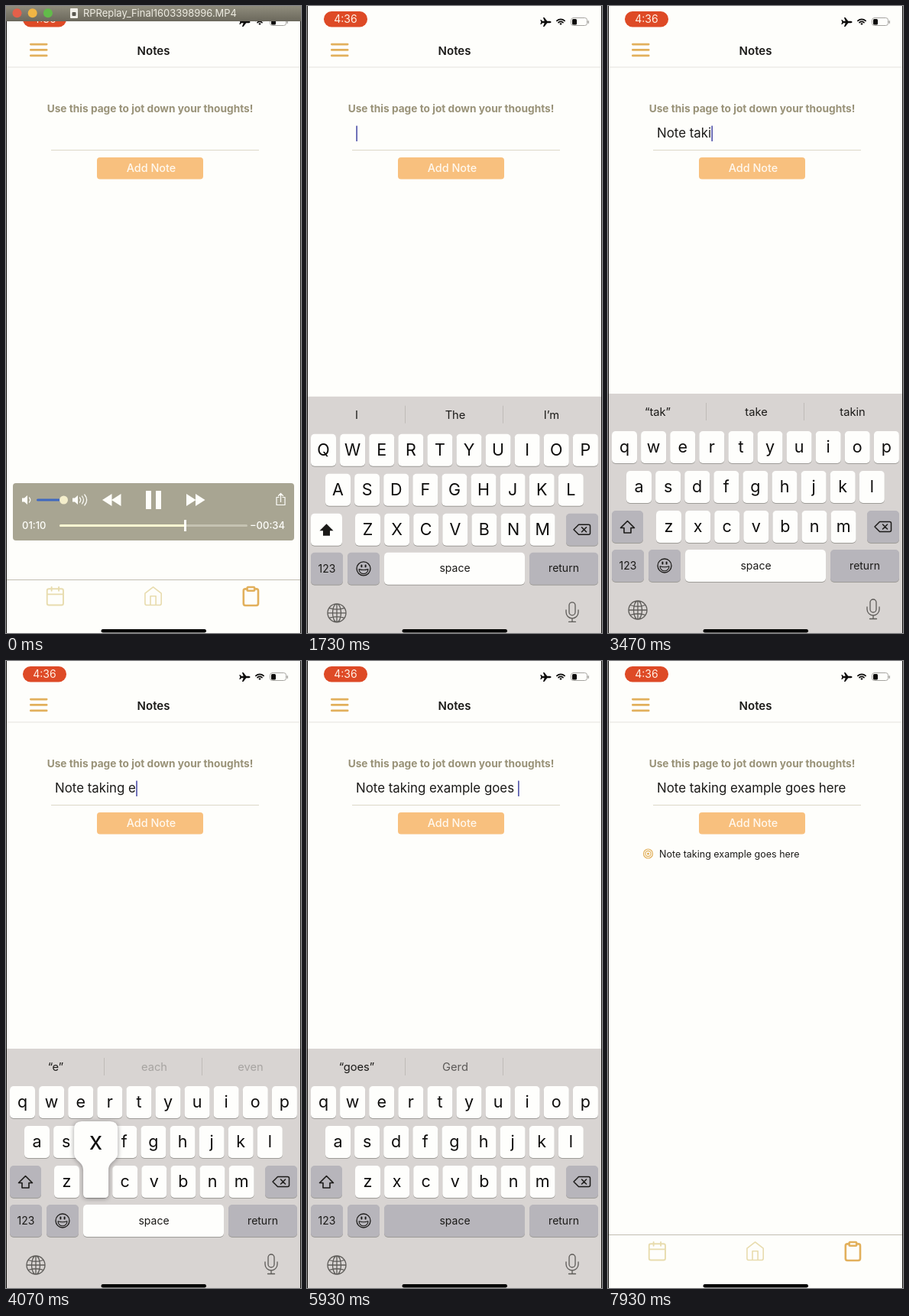
These frames come from a looping animation (386x820 px, 8 s). An HTML page with a canvas:

```html
<!DOCTYPE html>
<html lang="en">
<head>
<meta charset="utf-8">
<title>Notes</title>
<style>
  html, body { margin: 0; width: 100%; height: 100%; overflow: hidden; background: #fefefb; }
  canvas { display: block; width: 386px; height: 820px; }
</style>
</head>
<body>
<canvas id="stage"></canvas>
<script>
const W = 386, H = 820, LOOP = 8000;
const canvas = document.getElementById('stage');
const ctx = canvas.getContext('2d');
const ratio = window.devicePixelRatio || 1;
canvas.width = W * ratio;
canvas.height = H * ratio;

const PAGE = '#fefefb', INK = '#1b1a18', KEY = '#fefefc', GREY = '#b7b5bb';
const BOARD = '#d8d4d2', GOLD = '#e2b05c', PALE = '#e8dcae';

const NOTE = 'Note taking example goes here';
// moment each character of NOTE lands in the field
const TYPED = [2250, 2450, 2570, 2710, 2850, 2990, 3130, 3260, 3400, 3570, 3700,
  3830, 3960, 4090, 4210, 4330, 4460, 4580, 4700, 4950, 5180, 5380, 5580, 5780,
  5900, 6060, 6210, 6360, 6510];
// suggestion bar after each character
const HINTS = ['I|The|I’m', '“N”||', '“No”|Not|Now', '“Not”|Note|Nothing', '“Note”|Notes|Noted',
  'that|to|the', '“t”|to|the', '“ta”|take|talk', '“tak”|take|takin', '“taki”|taking|takin',
  '“takin”|taking|', '“taking”|takings|', 'the|a|it', '“e”|each|even', '“ex”|example|extra',
  '“exa”|exactly|example', '“exam”|example|exams', '“examp”|example|examples',
  '“exampl”|examples|', '“example”|examples|examples', 'of|is|for', '“g”|good|going',
  '“go”|good|going', '“goe”|goes|', '“goes”|Gerd|', 'to|on|the', '“h”|here|how',
  '“he”|here|her', '“her”|here|hers', '“here”|hereby|'].map(s => s.split('|'));
const HINT_LAG = 85, HINT_FADE = 100;
const HINT_X = [65, 194, 320];

const ROWS = [['qwertyuiop', 21.5, 556], ['asdfghjkl', 40.5, 608], ['zxcvbnm', 79.5, 660]];
const STEP = 38.1, KEY_W = 33, KEY_H = 42;

const PLAYER_FADE = [200, 550];
const BOARD_IN = [1500, 1800], BOARD_OUT = [6900, 7180];
const RETURN_PRESS = [6810, 6900], ADD_PRESS = [7420, 7540];

const clamp = (v, a = 0, b = 1) => Math.min(b, Math.max(a, v));
const span = (t, [a, b]) => clamp((t - a) / (b - a));
const within = (t, [a, b]) => t >= a && t < b;
const typedBy = t => TYPED.filter(at => at <= t).length;
const easeOut = p => 1 - (1 - p) ** 3;

function box(x, y, w, h, r, color) {
  ctx.fillStyle = color;
  ctx.beginPath();
  ctx.roundRect(x, y, w, h, r);
  ctx.fill();
}

function disc(x, y, r, color) {
  ctx.fillStyle = color;
  ctx.beginPath();
  ctx.arc(x, y, r, 0, Math.PI * 2);
  ctx.fill();
}

function text(str, x, y, size, color, { weight = 400, align = 'center' } = {}) {
  ctx.font = `${weight} ${size}px Inter, sans-serif`;
  ctx.textAlign = align;
  ctx.textBaseline = 'alphabetic';
  ctx.fillStyle = color;
  ctx.fillText(str, x, y);
}

// strokes or fills an SVG path placed at x, y
function glyph(d, x, y, { scale = 1, color = INK, width = 1.5, fill = false } = {}) {
  ctx.save();
  ctx.translate(x, y);
  ctx.scale(scale, scale);
  const path = new Path2D(d);
  if (fill) {
    ctx.fillStyle = color;
    ctx.fill(path);
  } else {
    ctx.strokeStyle = color;
    ctx.lineWidth = width / scale;
    ctx.lineCap = ctx.lineJoin = 'round';
    ctx.stroke(path);
  }
  ctx.restore();
}

function statusBar() {
  box(22, 7, 57, 20.5, 10, '#de4a26');
  text('4:36', 50.5, 22, 14, '#fff1e6');
  const plane = 'M7 0C7-1.2 5.5-1.3 4.5-1.3H1.8L-2-6H-3.6L-1.8-1.3H-4.6L-6-3H-7.2L-6.2 0L-7.2 3H-6L-4.6 1.3H-1.8L-3.6 6H-2L1.8 1.3H4.5C5.5 1.3 7 1.2 7 0Z';
  glyph(plane, 312.5, 21, { fill: true, color: '#0c0b0a' });
  glyph('M-5.8-1.6A8.2 8.2 0 0 1 5.8-1.6M-3.4 1A4.8 4.8 0 0 1 3.4 1', 332, 20.8,
    { scale: 0.88, width: 1.7, color: '#0c0b0a' });
  glyph('M-1.9 2.7A2.7 2.7 0 0 1 1.9 2.7L0 4.9Z', 332, 20.8,
    { scale: 0.88, fill: true, color: '#0c0b0a' });
  glyph('M3 0H18A3 3 0 0 1 21 3V7A3 3 0 0 1 18 10H3A3 3 0 0 1 0 7V3A3 3 0 0 1 3 0Z',
    345.5, 15.5, { width: 1, color: '#a5a4a0' });
  box(347, 17, 6, 7.5, 1.5, '#0c0b0a');
  box(367.5, 19, 1.5, 4, 1, '#a5a4a0');
}

function header() {
  for (let i = 0; i < 3; i++) box(31, 48.7 + i * 7.4, 23.5, 2.7, 1.3, GOLD);
  text('Notes', 193, 64, 15, INK, { weight: 600 });
  box(1, 79.5, W - 2, 1, 0, '#e5e3dd');
}

function tabBar() {
  box(1, 750, W - 2, 1, 0, '#c2beb2');
  glyph('M5 4H19A2 2 0 0 1 21 6V20A2 2 0 0 1 19 22H5A2 2 0 0 1 3 20V6A2 2 0 0 1 5 4ZM16 2V6M8 2V6M3 10H21',
    50.2, 757.6, { scale: 1.18, width: 1.9, color: PALE });
  glyph('M3 9L12 2L21 9V20A2 2 0 0 1 19 22H5A2 2 0 0 1 3 20ZM9 22V12H15V22',
    178.4, 757.6, { scale: 1.18, width: 1.6, color: PALE });
  glyph('M16 4H18A2 2 0 0 1 20 6V20A2 2 0 0 1 18 22H6A2 2 0 0 1 4 20V6A2 2 0 0 1 6 4H8M9 2H15A1 1 0 0 1 16 3V5A1 1 0 0 1 15 6H9A1 1 0 0 1 8 5V3A1 1 0 0 1 9 2Z',
    306, 757.6, { scale: 1.2, width: 2.6, color: GOLD });
}

function notesPage(t, count) {
  text('Use this page to jot down your thoughts!', 188.5, 138.5, 13.7, '#999278', { weight: 700 });
  box(59, 188, 272, 1, 0, '#dcd8c8');

  const value = NOTE.slice(0, count);
  text(value, 64, 172.3, 16.85, INK, { align: 'left' });
  if (within(t, [BOARD_IN[0], BOARD_OUT[0]])) {
    box(64.3 + ctx.measureText(value).width, 156.5, 1.6, 20.5, 0.5, '#4c4fa8');
  }

  ctx.globalAlpha = within(t, ADD_PRESS) ? 0.4 : 1;
  box(119, 198, 139, 28.5, 4, '#f8c07e');
  text('Add Note', 190, 217, 14.4, '#fff8ee', { weight: 500 });
  ctx.globalAlpha = 1;

  if (t >= ADD_PRESS[1]) {
    for (const r of [6, 3.6]) {
      glyph(`M${r} 0A${r} ${r} 0 1 1 ${-r} 0A${r} ${r} 0 1 1 ${r} 0Z`, 52.5, 252,
        { width: 1.2, color: GOLD });
    }
    disc(52.5, 252, 1.6, GOLD);
    text(NOTE, 67, 257, 12.5, INK, { align: 'left' });
  }
}

function key(x, y, w, color) {
  box(x, y + 1, w, KEY_H, 5, '#9e9c98');
  box(x, y, w, KEY_H, 5, color);
}

function popup(ch, x, y) {
  const c = clamp(x, 32, W - 32), l = x - 16.5, r = x + 16.5;
  const left = c - 28.5, right = c + 28.5, top = y - 58, low = y + 42;
  ctx.save();
  ctx.shadowColor = 'rgba(60,58,60,.5)';
  ctx.shadowBlur = 6 * ratio;
  ctx.shadowOffsetY = ratio;
  ctx.fillStyle = KEY;
  ctx.beginPath();
  ctx.moveTo(left, top + 10);
  ctx.quadraticCurveTo(left, top, left + 10, top);
  ctx.lineTo(right - 10, top);
  ctx.quadraticCurveTo(right, top, right, top + 10);
  ctx.lineTo(right, y - 16);
  ctx.bezierCurveTo(right, y - 6, r, y - 6, r, y + 6);
  ctx.lineTo(r, low - 5);
  ctx.quadraticCurveTo(r, low, r - 5, low);
  ctx.lineTo(l + 5, low);
  ctx.quadraticCurveTo(l, low, l, low - 5);
  ctx.lineTo(l, y + 6);
  ctx.bezierCurveTo(l, y - 6, left, y - 6, left, y - 16);
  ctx.closePath();
  ctx.fill();
  ctx.restore();
  text(ch, c, y - 21, 32, '#0e0d0c');
}

// the bar trails the typing a little, and new words fade in
function hints(t) {
  const shown = typedBy(t - HINT_LAG);
  const now = HINTS[shown], before = HINTS[Math.max(0, shown - 1)];
  const fresh = shown ? clamp((t - HINT_LAG - TYPED[shown - 1]) / HINT_FADE) : 1;
  now.forEach((word, i) => {
    ctx.globalAlpha = i && word !== before[i] ? fresh : 1;
    text(word, HINT_X[i], 536, 14.7, INK);
  });
  ctx.globalAlpha = 1;
  box(128, 519, 1, 23, 0, '#bfbbb8');
  box(256, 519, 1, 23, 0, '#bfbbb8');
}

function keyboard(t, count) {
  const shown = easeOut(span(t, BOARD_IN)) - easeOut(span(t, BOARD_OUT));
  if (shown <= 0) return;
  const pressed = TYPED.findIndex(at => within(t, [at - 90, at + 50]));
  const active = pressed < 0 ? '' : NOTE[pressed];
  const upper = count === 0;

  ctx.save();
  ctx.translate(0, (1 - shown) * (H - 507));
  box(1, 507, W - 2, H - 507, 0, BOARD);
  hints(t);

  let bubble = null;
  for (const [letters, x0, y] of ROWS) {
    [...letters].forEach((ch, i) => {
      const x = x0 + i * STEP;
      key(x - KEY_W / 2, y, KEY_W, KEY);
      text(upper ? ch.toUpperCase() : ch, x, y + 28, 21.5, '#0e0d0c');
      if (active && ch === active.toLowerCase()) bubble = [active, x, y];
    });
  }

  key(5, 660, 41, upper ? KEY : GREY);
  glyph('M0-8L9 1H4.5V7.5H-4.5V1H-9Z', 25.5, 681.5, { width: 1.6, fill: upper });
  key(339, 660, 42, GREY);
  glyph('M-11 0L-4.5-6.5H8.5A2 2 0 0 1 10.5-4.5V4.5A2 2 0 0 1 8.5 6.5H-4.5ZM-.5-3L5.5 3M5.5-3L-.5 3',
    360, 681, { width: 1.5 });

  key(5, 711, 42, GREY);
  text('123', 26, 737, 14, INK);
  key(53, 711, 42, GREY);
  glyph('M9 0A9 9 0 1 1-9 0A9 9 0 1 1 9 0Z', 74, 732, { width: 1.3 });
  glyph('M-6 .8Q0 2.6 6 .8A6 6 0 0 1-6 .8Z', 74, 732, { width: 1.1 });
  glyph('M-2.6-4.4V-2.6M2.6-4.4V-2.6', 74, 732, { width: 2 });
  key(101, 711, 184, active === ' ' ? GREY : KEY);
  text('space', 193.5, 736.5, 14, INK);
  key(291, 711, 90, within(t, RETURN_PRESS) ? KEY : GREY);
  text('return', 336, 736.5, 14, INK);

  const tool = { width: 1.3, color: '#5d5b58' };
  glyph('M12 0A12 12 0 1 1-12 0A12 12 0 1 1 12 0ZM5.5 0A5.5 12 0 1 1-5.5 0A5.5 12 0 1 1 5.5 0ZM0-12V12M-12 0H12M-10-6.5Q0-3 10-6.5M-10 6.5Q0 3 10 6.5',
    39, 790, tool);
  glyph('M-4-9A4 4 0 0 1 4-9V0A4 4 0 0 1-4 0ZM-8-3V0A8 8 0 0 0 8 0V-3M0 8V12.5M-4.5 12.5H4.5',
    347, 789, tool);

  if (bubble) popup(...bubble);
  ctx.restore();
}

function titleBar() {
  const shade = ctx.createLinearGradient(0, 0, 0, 20);
  shade.addColorStop(0, '#8f8c7c');
  shade.addColorStop(1, '#6b685c');
  box(0, 0, W, 20, 0, shade);
  ['#e4604a', '#f1b544', '#62bb4a'].forEach((c, i) => disc(14.5 + i * 20.2, 9.3, 6, c));
  box(84, 3, 10, 13, 1, '#f2f0ea');
  box(86.5, 8, 5, 5, 1, '#5a5850');
  text('RPReplay_Final1603398996.MP4', 101, 14.3, 12.95, '#eeece2', { align: 'left' });
}

function player(t) {
  const light = '#fefefa';
  const solid = { fill: true, color: light };
  const thin = { width: 1.2, color: light };
  box(9, 624, 368, 75, 4, '#a8a592');
  const speaker = 'M0-2.5H3L7-6V6L3 2.5H0Z';
  glyph(speaker, 21, 646, solid);
  glyph('M9.5-3Q12 0 9.5 3', 21, 646, thin);
  box(40, 644.5, 36, 3, 1.5, '#3f68c0');
  disc(75.5, 646, 5.5, '#f4eecb');
  glyph(speaker, 87, 646, solid);
  glyph('M9.5-3Q12 0 9.5 3M12.5-5Q16.5 0 12.5 5M15.8-7Q21.5 0 15.8 7', 87, 646, thin);

  glyph('M0 0L12.5-8V8ZM12 0L24.5-8V8Z', 126, 646, solid);
  glyph('M0-8L12.5 0L0 8ZM12-8L24.5 0L12 8Z', 236, 646, solid);
  box(183, 634, 7, 24, 0, light);
  box(196, 634, 7, 24, 0, light);
  glyph('M-2.5-3H-5.5V7H5.5V-3H2.5M0 3V-8M-3-5L0-8L3-5', 359.5, 645.5, thin);

  const head = 234.5 + t / 1000 * 2.35;
  box(70, 678, 246, 3, 1.5, '#c5c3b2');
  box(70, 678, head - 70, 3, 1.5, '#fcfad2');
  box(head - 1.5, 672, 3, 15, 0.5, light);
  text('01:10', 21, 684, 13, light, { align: 'left', weight: 500 });
  text('−00:34', 365, 684, 13, light, { align: 'right', weight: 500 });
}

function draw(t) {
  const count = typedBy(t);
  ctx.setTransform(ratio, 0, 0, ratio, 0, 0);
  ctx.globalAlpha = 1;
  box(0, 0, W, H, 0, PAGE);
  statusBar();
  header();
  notesPage(t, count);
  tabBar();
  keyboard(t, count);
  box(124.5, 815, 137.5, 4.6, 2.3, '#050504');
  box(0, 0, 1, H, 0, '#12110e');
  box(W - 1, 0, 1, H, 0, '#12110e');

  const overlay = 1 - span(t, PLAYER_FADE);
  if (overlay > 0) {
    ctx.globalAlpha = overlay;
    titleBar();
    player(t);
    ctx.globalAlpha = 1;
  }
}

const start = performance.now();
function tick() {
  draw((performance.now() - start) % LOOP);
  requestAnimationFrame(tick);
}
tick();
</script>
</body>
</html>
```
